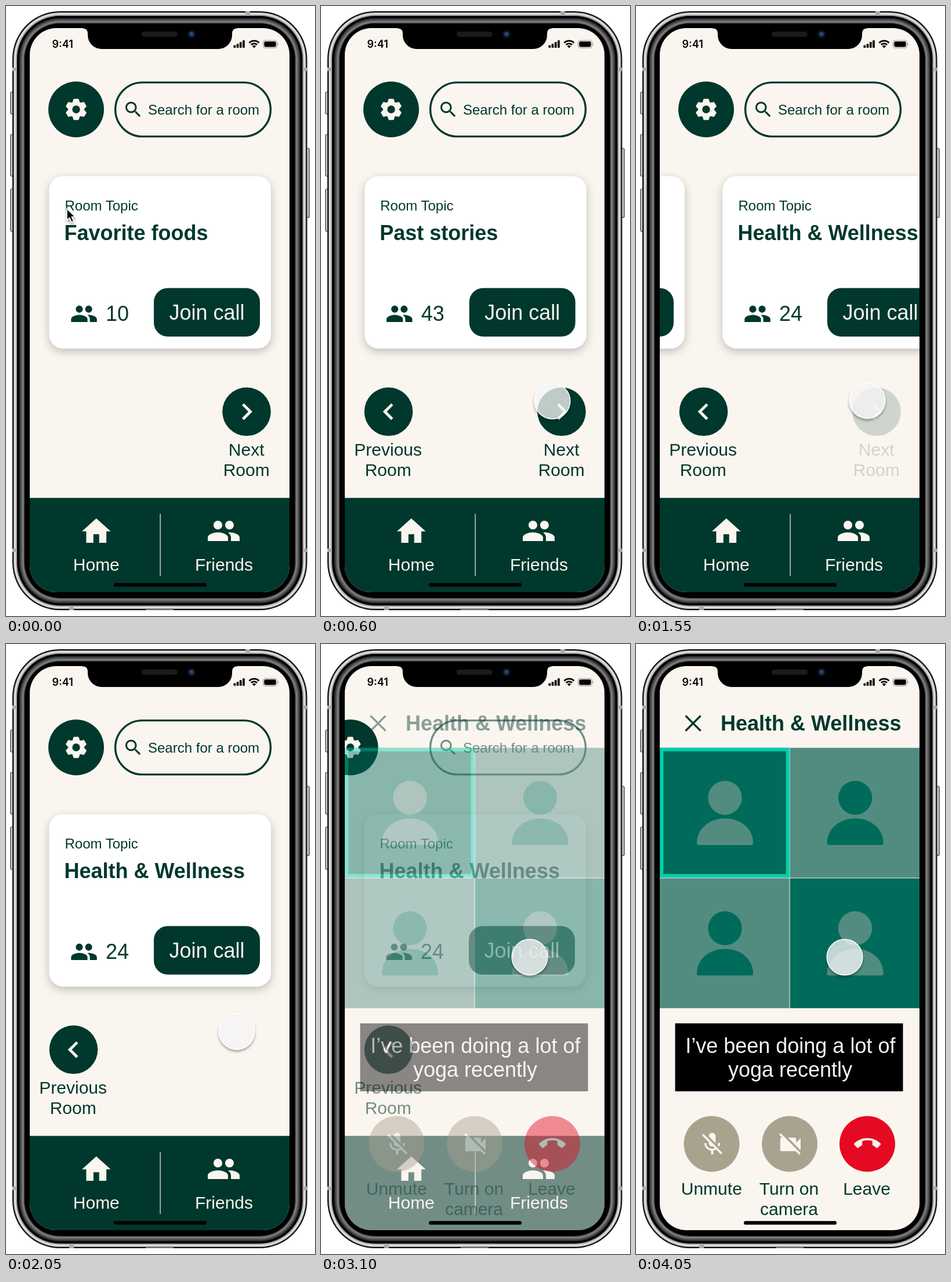
These frames come from a looping animation (533 by 1050 pixels, 4.2 s). An HTML page:

```html
<!DOCTYPE html>
<html lang="en">
<head>
<meta charset="utf-8">
<title>Room call prototype</title>
<style>
  html, body { margin: 0; width: 100%; height: 100%; overflow: hidden; background: #fff; }
  svg { display: block; width: 533px; height: 1050px; }
  text { font-family: "Liberation Sans", Arial, Helvetica, sans-serif; }
  .clock { font: 600 18px Inter, sans-serif; }
</style>
</head>
<body>
<svg id="stage" viewBox="0 0 533 1050" xmlns="http://www.w3.org/2000/svg"></svg>
<script>
const LOOP = 4200, STEP = 50, PAGE = 448;
const DARK = '#00382d', CREAM = '#faf5ef', TEAL = '#006b5a', SAGE = '#528c80';

const ICONS = {
  group: 'M16 11c1.66 0 2.99-1.34 2.99-3S17.66 5 16 5c-1.66 0-3 1.34-3 3s1.34 3 3 3zm-8 0c1.66 0 2.99-1.34 2.99-3S9.66 5 8 5C6.34 5 5 6.34 5 8s1.34 3 3 3zm0 2c-2.33 0-7 1.17-7 3.5V19h14v-2.5c0-2.33-4.67-3.5-7-3.5zm8 0c-.29 0-.62.02-.97.05 1.16.84 1.97 1.97 1.97 3.45V19h6v-2.5c0-2.33-4.67-3.5-7-3.5z',
  home: 'M10 20v-6h4v6h5v-8h3L12 3 2 12h3v8z',
  search: 'M15.5 14h-.79l-.28-.27C15.41 12.59 16 11.11 16 9.5 16 5.91 13.09 3 9.5 3S3 5.91 3 9.5 5.91 16 9.5 16c1.61 0 3.09-.59 4.23-1.57l.27.28v.79l5 4.99L20.49 19l-4.99-5zm-6 0C7.01 14 5 11.99 5 9.5S7.01 5 9.5 5 14 7.01 14 9.5 11.99 14 9.5 14z',
  next: 'M10 6L8.59 7.41 13.17 12l-4.58 4.59L10 18l6-6z',
  prev: 'M15.41 7.41L14 6l-6 6 6 6 1.41-1.41L10.83 12z',
  micOff: 'M19 11h-1.7c0 .74-.16 1.43-.43 2.05l1.23 1.23c.56-.98.9-2.09.9-3.28zm-4.02.17c0-.06.02-.11.02-.17V5c0-1.66-1.34-3-3-3S9 3.34 9 5v.18l5.98 5.99zM4.27 3L3 4.27l6.01 6.01V11c0 1.66 1.33 3 2.99 3 .22 0 .44-.03.65-.08l1.66 1.66c-.71.33-1.5.52-2.31.52-2.76 0-5.3-2.1-5.3-5.1H5c0 3.41 2.72 6.23 6 6.72V21h2v-3.28c.91-.13 1.77-.45 2.54-.9L19.73 21 21 19.73z',
  camOff: 'M21 6.5l-4 4V7c0-.55-.45-1-1-1H9.82L21 17.18V6.5zM3.27 2L2 3.27 4.73 6H4c-.55 0-1 .45-1 1v10c0 .55.45 1 1 1h12c.21 0 .39-.08.54-.18L19.73 21 21 19.73z',
  hangUp: 'M12 9c-1.6 0-3.15.25-4.6.72v3.1c0 .39-.23.74-.56.9-.98.49-1.87 1.12-2.66 1.85-.4.37-1 .37-1.41-.01L.29 13.08c-.39-.39-.39-1 0-1.41C3.34 8.78 7.46 7 12 7s8.66 1.78 11.71 4.67c.39.39.39 1 0 1.42l-2.48 2.48c-.4.38-1 .38-1.41.01-.79-.74-1.69-1.37-2.67-1.85-.33-.16-.56-.5-.56-.9v-3.1C15.15 9.25 13.6 9 12 9z'
};

// Drawing helpers
const box = (x, y, x2, y2, r, fill, more = '') =>
  `<rect x="${x}" y="${y}" width="${x2 - x}" height="${y2 - y}" rx="${r}" fill="${fill}" ${more}/>`;
const dot = (x, y, r, fill, more = '') => `<circle cx="${x}" cy="${y}" r="${r}" fill="${fill}" ${more}/>`;
const icon = (name, x, y, scale, fill) =>
  `<path d="${ICONS[name]}" transform="translate(${x} ${y}) scale(${scale})" fill="${fill}"/>`;
const text = (s, x, y, size, fill = DARK, more = '') =>
  `<text x="${x}" y="${y}" font-size="${size}" fill="${fill}" ${more}>${s}</text>`;
const mid = (s, x, y, size, fill) => text(s, x, y, size, fill, 'text-anchor="middle"');
const group = (id, body, more = '') => `<g id="${id}" ${more}>${body}</g>`;

function card(id, topic, count) {
  return group(id,
    box(74.5, 293, 457, 589.5, 24, '#fff', 'filter="url(#cardShadow)"') +
    text('Room Topic', 101.5, 352, 24) +
    text(topic, 100.5, 403, 36, DARK, 'font-weight="700"') +
    icon('group', 110.3, 505.6, 2.02, DARK) +
    text(count, 172, 542, 36) +
    box(255, 485.5, 438, 569, 24, DARK) +
    mid('Join call', 346.5, 539.5, 36, CREAM));
}

function arrowButton(id, name, label, x, labelX, iconX) {
  return group(id,
    dot(x, 698.3, 41.8, DARK) + icon(name, iconX, 669.5, 2.4, CREAM) +
    mid(label, labelX, 774, 30) + mid('Room', labelX, 808.5, 30));
}

function gear() {
  const tooth = a => `<path d="M-6.3 -10L-3.7 -17.5H3.7L6.3 -10Z" transform="rotate(${a})"/>`;
  return group('gear',
    dot(121, 178, 48, DARK) +
    `<g transform="translate(121 178)" fill="${CREAM}" stroke="${CREAM}" stroke-width="1.6" stroke-linejoin="round">` +
    [0, 60, 120, 180, 240, 300].map(tooth).join('') + '<circle r="12.6"/></g>' +
    dot(121, 178, 6.7, DARK));
}

function person(x, y, fill) {
  return `<g transform="translate(${x} ${y})" fill="${fill}"><circle r="29.2"/>` +
    '<path d="M-48.5 78C-48.5 53-27 35.5 0 35.5S48.5 53 48.5 78Q48.5 81.3 45 81.3H-45Q-48.5 81.3-48.5 78Z"/></g>';
}

function callScreen() {
  const tile = (x, y, bg, fg) => box(x, y, x + 223.6, y + 223.6, 0, bg) + person(x + 112.5, y + 86, fg);
  const control = (name, x, ix, iy, bg, scale) => dot(x, 860.5, 48, bg) + icon(name, ix, iy, scale, CREAM);
  return '<path d="M85.5 123.5L111.5 149.5M111.5 123.5L85.5 149.5" stroke="' + DARK + '" stroke-width="3.3"/>' +
    text('Health &amp; Wellness', 146, 148.5, 36, DARK, 'font-weight="700"') +
    tile(41, 178.7, TEAL, SAGE) + tile(265.6, 178.7, SAGE, TEAL) +
    tile(41, 403.3, SAGE, TEAL) + tile(265.6, 403.3, TEAL, SAGE) +
    box(44.2, 181.7, 261.7, 399, 0, 'none', 'stroke="#02cfae" stroke-width="6"') +
    box(67.5, 653, 460.5, 770, 0, '#000') +
    mid('I’ve been doing a lot of', 266.3, 703.5, 36, CREAM) +
    mid('yoga recently', 266, 744.5, 36, CREAM) +
    control('micOff', 130.5, 108, 837.5, '#a8a38f', 1.95) +
    control('camOff', 265, 243, 838, '#a8a38f', 1.95) +
    control('hangUp', 399, 376, 837, '#e50a22', 1.92) +
    mid('Unmute', 130.3, 948, 30) + mid('Turn on', 264, 948, 30) +
    mid('camera', 264, 983, 30) + mid('Leave', 398, 948, 30);
}

function homeScreen() {
  return box(188.6, 131.6, 456.4, 224.6, 46.5, 'none', `stroke="${DARK}" stroke-width="3.4"`) +
    icon('search', 201.5, 160.3, 1.5, DARK) + text('Search for a room', 245, 187, 24) +
    card('card0', 'Favorite foods', 10) + card('card1', 'Past stories', 43) +
    card('card2', 'Health &amp; Wellness', 24) +
    arrowButton('prev', 'prev', 'Previous', 116.5, 115.7, 87.5) +
    arrowButton('next', 'next', 'Next', 415, 414.7, 386.5) +
    box(41, 846.7, 489, 1010, 0, DARK) +
    box(265.5, 874, 266.7, 981, 0, CREAM) +
    icon('home', 126, 874.5, 2.48, CREAM) + icon('group', 345.5, 873.5, 2.5, CREAM) +
    mid('Home', 155.8, 972, 30, CREAM) + mid('Friends', 376, 972, 30, CREAM);
}

function phone() {
  const ring = (inset, fill) => box(11 + inset, 9 + inset, 519.5 - inset, 1040 - inset, 82 - inset, fill);
  const key = (x, y, y2) => box(x, y, x + 6, y2, 2, '#d4d4d4', 'stroke="#222" stroke-width="1.2"');
  const bands = [109, 937].map(y => box(11, y - 3, 19, y + 3, 0, '#aaa') + box(511.5, y - 3, 519.5, y + 3, 0, '#aaa'));
  return key(8, 148, 186) + key(8, 221, 293) + key(8, 315, 388) + key(517, 245, 364) +
    ring(0, '#0c0c0c') + ring(2, '#8f8f8f') + ring(3, '#dedede') + ring(6, '#a2a2a2') + bands.join('') +
    box(413, 9, 421, 17, 0, '#aaa') + box(109, 1032, 117, 1040, 0, '#aaa') +
    box(241, 1037, 289, 1040, 0, '#777') +
    ring(8, '#000') + ring(12, '#353535') + ring(14.5, '#5c5c5c') + ring(17, '#7d7d7d') +
    ring(19.5, '#4a4a4a') + ring(21, '#000');
}

function statusBar() {
  const bars = [4.5, 7, 10, 13].map((h, i) => box(392.5 + i * 5.2, 72 - h, 396.2 + i * 5.2, 72, 1, '#000')).join('');
  const arc = r => `<path d="M${428 - r * .71} ${72 - r * .71}A${r} ${r} 0 0 1 ${428 + r * .71} ${72 - r * .71}" fill="none" stroke="#000" stroke-width="2.8"/>`;
  return '<path d="M132 37V38.5Q141 38.5 141 47V50A24 24 0 0 0 165 74H366A24 24 0 0 0 390 50V47Q390 38.5 399 38.5V37Z"/>' +
    box(234, 44, 296, 53, 4.5, '#1b1b1c') + dot(320, 48.5, 7, '#0c1524') + dot(320, 48.5, 4, '#1a3d66') +
    dot(320, 47.5, 1.6, '#2f5f92') +
    '<text class="clock" x="79.5" y="71.7">9:41</text>' + bars +
    arc(12) + arc(7.3) + '<path d="M428 72.5L424.8 69A4.6 4.6 0 0 1 431.2 69Z"/>' +
    box(443.5, 59.2, 467.5, 72.3, 4, 'none', 'stroke="#000" stroke-opacity=".4" stroke-width="1.1"') +
    box(445.3, 61, 465.7, 70.5, 2.4, '#000') +
    '<path d="M469 63.5Q471.2 65.8 469 68Z" fill="#000" fill-opacity=".45"/>';
}

// The touch shadow is cut out below the disc so that the glassy fill stays light.
document.getElementById('stage').innerHTML = `<defs>
  <filter id="cardShadow" x="-20%" y="-20%" width="140%" height="140%">
    <feDropShadow dx="0" dy="5" stdDeviation="8" flood-color="#000" flood-opacity=".24"/></filter>
  <filter id="touchShadow" x="-30%" y="-30%" width="160%" height="160%">
    <feGaussianBlur in="SourceAlpha" stdDeviation="2"/>
    <feOffset dy="2.5"/>
    <feComponentTransfer><feFuncA type="linear" slope=".42"/></feComponentTransfer>
    <feComposite in2="SourceAlpha" operator="out" result="shade"/>
    <feMerge><feMergeNode in="shade"/><feMergeNode in="SourceGraphic"/></feMerge></filter>
  <clipPath id="screen">${box(41, 38, 489, 1009, 46, '#000')}</clipPath>
</defs>` + phone() +
  '<g clip-path="url(#screen)">' + box(41, 38, 489, 1009, 0, CREAM) +
  group('home', homeScreen()) + gear() + group('call', callScreen()) + '</g>' +
  statusBar() + box(186, 993.3, 346, 999.5, 3.1, '#000') +
  group('touch', '<circle r="30.8" fill="#f8f8f8" fill-opacity=".76" stroke="#fff" stroke-width="1.4"/>', 'filter="url(#touchShadow)"') +
  group('pointer', '<path d="M0 0V19.5L4.6 15.4L8 23L11.6 21.4L8.3 14H14.2Z" fill="#000" stroke="#fff" stroke-width="1.5"/>',
    'transform="translate(105 349)" filter="url(#touchShadow)"');

// Motion
const clamp = v => Math.max(0, Math.min(1, v));
function bezier(x1, x2) {
  return v => {
    let lo = 0, hi = 1;
    for (let i = 0; i < 24; i++) {
      const s = (lo + hi) / 2, x = 3 * x1 * s * (1 - s) ** 2 + 3 * x2 * s * s * (1 - s) + s ** 3;
      if (x < v) lo = s; else hi = s;
    }
    return lo * lo * (3 - 2 * lo);
  };
}
const easeOut = bezier(0, .58), easeInOut = bezier(.42, .58);
const progress = (t, start, length, ease) => {
  const v = clamp((t - start) / length);
  return v === 0 || v === 1 ? v : ease(v);
};

const TOUCH = [
  [50, 120, 375], [100, 175, 450], [150, 270, 560], [200, 355, 640], [250, 399, 680],
  [1400, 399, 680], [1450, 399, 679], [2000, 399, 679], [2050, 398, 667],
  [2150, 386, 625], [2250, 371, 572], [2350, 361, 542], [2400, 360, 539]
];
function touchAt(t) {
  const i = TOUCH.findIndex(k => k[0] > t);
  if (i < 0) return TOUCH[TOUCH.length - 1].slice(1);
  if (i === 0) return TOUCH[0].slice(1);
  const [a, b] = [TOUCH[i - 1], TOUCH[i]], v = (t - a[0]) / (b[0] - a[0]);
  return [1, 2].map(n => a[n] + (b[n] - a[n]) * v);
}

const el = id => document.getElementById(id);
const move = (id, x, y = 0) => el(id).setAttribute('transform', `translate(${x} ${y})`);
const fade = (id, v) => { el(id).style.opacity = v; el(id).style.display = v ? '' : 'none'; };

function draw(t) {
  const first = progress(t, 309, 300, easeOut);
  const second = progress(t, 1354, 300, easeOut);
  const join = progress(t, 3000, 212, easeInOut);
  for (let i = 0; i < 3; i++) move('card' + i, PAGE * (i - first - second));
  fade('prev', first);
  fade('next', 1 - second);
  fade('home', 1 - join);
  fade('call', join);
  move('gear', -156 * join);
  move('touch', ...touchAt(t));
  fade('touch', t < 50 ? 0 : 1);
  fade('pointer', t < 50 ? 1 : 0);
}

const began = performance.now();
function tick() {
  const t = (performance.now() - began) % LOOP;
  draw(Math.floor((t + 4) / STEP) * STEP % LOOP);
  requestAnimationFrame(tick);
}
tick();
</script>
</body>
</html>
```
